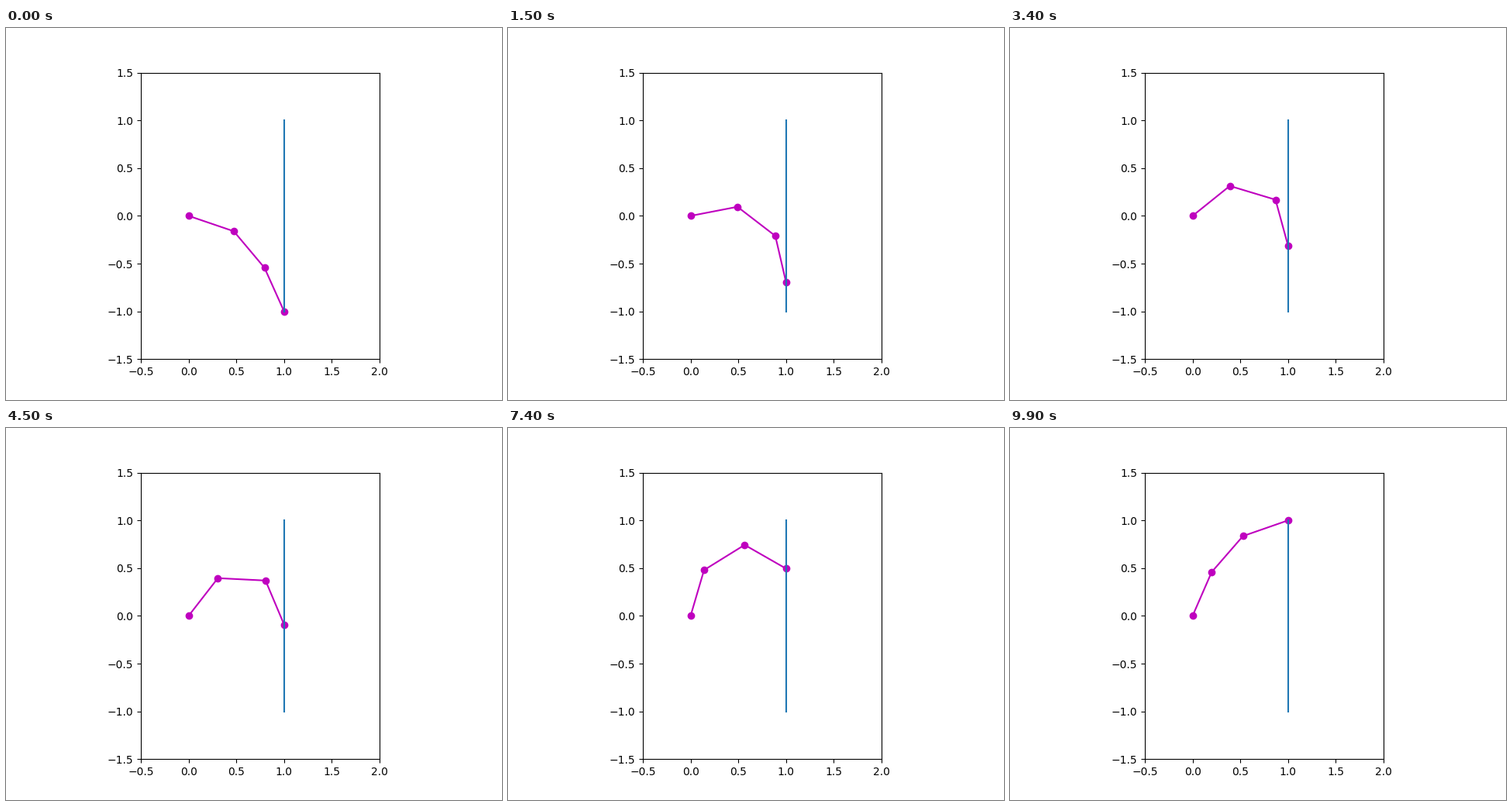
Recreate the animation shown at these times as a matplotlib script. Size 640 by 480 pixels, loop 10000 ms.

```python
import numpy as np
import matplotlib.pyplot as plt
from matplotlib.animation import FuncAnimation

FRAMES = 100
LINK = 0.5
START = np.radians([-18.8, -31.1, -15.8])


def joints(q):
    """Positions of base, both elbows and tip for relative angles q."""
    a = np.cumsum(q)
    x = np.concatenate(([0], np.cumsum(LINK * np.cos(a))))
    y = np.concatenate(([0], np.cumsum(LINK * np.sin(a))))
    return x, y


def solve(q, target):
    """Move the tip to target with pseudoinverse Newton steps."""
    for _ in range(30):
        x, y = joints(q)
        err = target - np.array([x[-1], y[-1]])
        if np.hypot(*err) < 1e-9:
            break
        jac = np.array([y[:-1] - y[-1], x[-1] - x[:-1]])
        q = q + np.linalg.pinv(jac) @ err
    return q


def trajectory():
    q, poses = START, []
    for y in np.linspace(-1, 1, FRAMES):
        q = solve(q, np.array([1.0, y]))
        poses.append(joints(q))
    return poses


poses = trajectory()

fig, ax = plt.subplots(figsize=(6.4, 4.8), dpi=100)
ax.set_aspect("equal")
ax.set_xlim(-0.5, 2)
ax.set_ylim(-1.5, 1.5)
arm, = ax.plot(*poses[0], "mo-")
ax.plot([1, 1], [-1, 1], color="C0")


def update(i):
    arm.set_data(*poses[i])
    return arm,


anim = FuncAnimation(fig, update, frames=FRAMES, interval=100,
                     repeat=True, repeat_delay=0)
plt.show()
```
